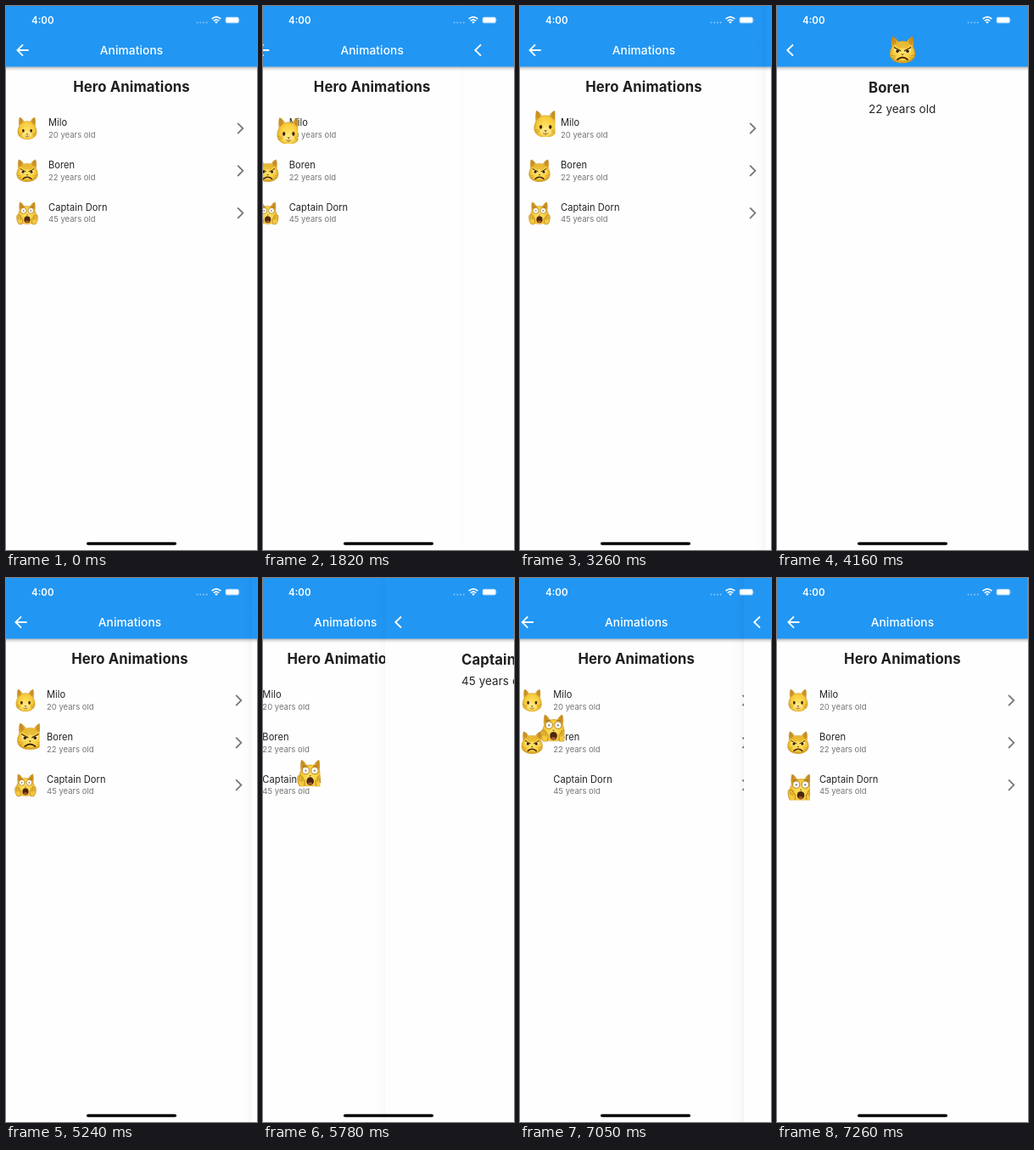
Animation of 296 by 640 pixels, one loop 7.31 s. Source, as an HTML page:

```html
<!DOCTYPE html>
<html lang="en">
<head>
<meta charset="utf-8">
<title>Hero Animations</title>
<style>
  html, body { margin: 0; width: 100%; height: 100%; overflow: hidden; background: #fefefe; }
  svg { display: block; width: 296px; height: 640px; font-family: Inter, Roboto, sans-serif; }
  .title { font-size: 13.7px; font-weight: 500; letter-spacing: .12px; fill: #fff; }
  .head { font-size: 16.7px; font-weight: 700; letter-spacing: .12px; fill: #1f1f1f; }
  .name { font-size: 11.1px; letter-spacing: .05px; fill: #222; }
  .age { font-size: 9.5px; fill: #757575; }
  .big { font-size: 13.5px; letter-spacing: .05px; fill: #262626; }
  .line { fill: none; stroke-width: 1.8; }
</style>
</head>
<body>
<svg id="stage" viewBox="0 0 296 640"></svg>
<script>
const W = 296, LOOP = 7310, FLIGHT = 400;

const people = [
  { name: 'Milo', age: 20, left: 108 },
  { name: 'Boren', age: 22, left: 108 },
  { name: 'Captain Dorn', age: 45, left: 90 },
];

// Screen refreshes happen in `steps` moments from `first` to `last`.
const moves = [
  { row: 0, push: true, start: 1790, first: 1820, last: 2260, steps: 5 },
  { row: 0, push: false, start: 2970, first: 3050, last: 3370, steps: 4 },
  { row: 1, push: true, start: 3757, first: 3850, last: 4160, steps: 4 },
  { row: 1, push: false, start: 4950, first: 5010, last: 5350, steps: 4 },
  { row: 2, push: true, start: 5700, first: 5780, last: 6100, steps: 4 },
  { row: 2, push: false, start: 6870, first: 6950, last: 7260, steps: 4 },
];

const rowY = row => 144 + 49.8 * row;
const lerp = (a, b, t) => a + (b - a) * t;

function cubic(x1, y1, x2, y2) {
  const at = (a, b, s) => 3 * a * s * (1 - s) ** 2 + 3 * b * s * s * (1 - s) + s ** 3;
  return x => {
    if (x <= 0 || x >= 1) return x <= 0 ? 0 : 1;
    let lo = 0, hi = 1;
    for (let i = 0; i < 30; i++) {
      const mid = (lo + hi) / 2;
      if (at(x1, x2, mid) < x) lo = mid; else hi = mid;
    }
    return at(y1, y2, lo);
  };
}
const slideIn = cubic(.35, .91, .33, .97);
const slideOut = cubic(.67, .03, .65, .09);
const heroEase = cubic(.4, 0, .2, 1);

// Circular path between two points, level or upright at one end.
function arc(a, b, t) {
  const dx = b.x - a.x, dy = b.y - a.y, dist = Math.hypot(dx, dy);
  const wide = Math.abs(dx) >= Math.abs(dy);
  const r = dist * dist / (2 * Math.abs(wide ? dy : dx));
  const sweep = 2 * Math.asin(dist / (2 * r));
  const angle = sweep * (wide ? t : 1 - t);
  const along = r * Math.sin(angle), across = r * (1 - Math.cos(angle));
  return wide
    ? { x: a.x + Math.sign(dx) * along, y: a.y + Math.sign(dy) * across }
    : { x: b.x - Math.sign(dx) * across, y: b.y - Math.sign(dy) * along };
}

const mirror = shape => `${shape}<g transform="scale(-1 1)">${shape}</g>`;

const head = `
  <path d="M-11.6-15.6C-9-15-6.4-12.2-4.8-9.6Q0-10.8 4.8-9.6C6.4-12.2 9-15 11.6-15.6
    C12.8-11.5 12.9-7 12.2-3.4C14.2 0 15 4 14.2 7.4C12.6 12.6 6.6 15.6 0 15.6
    S-12.6 12.6-14.2 7.4C-15 4-14.2 0-12.2-3.4C-12.9-7-12.8-11.5-11.6-15.6Z"
    fill="url(#fur)" stroke="#b98218" stroke-width=".4"/>
  ${mirror('<path d="M-10.9-13.6C-9-12.6-7.4-10.6-6.5-8.8L-11-4.8Q-11.8-9-10.9-13.6Z" fill="#c68a2a" opacity=".8"/>')}`;

const whiskers = mirror('<path d="M8 7.4L13.6 6.4M8 9L13 10" stroke="#a87a20" stroke-width=".5"/>');

const cats = [
  `<g transform="scale(.93 1)">${head}${whiskers}</g>
   <ellipse cy="8.6" rx="6.4" ry="5" fill="#ffec94" opacity=".7"/>
   ${mirror('<ellipse cx="5.6" cy="3.4" rx="1.6" ry="2.4" fill="#3d2811"/>')}
   <path d="M-1.8 7.4H1.8L0 9.2Z" fill="#70431c"/>
   <path d="M-3.2 10.6Q-1.5 12.6 0 10.6Q1.5 12.6 3.2 10.6" fill="none" stroke="#70431c" stroke-width=".8"/>
   <path d="M-1.2 12.2Q0 14 1.2 12.2Z" fill="#a35325"/>`,

  `<g transform="scale(1.03 1)">${head}${whiskers}</g>
   <path d="M-9.5-7Q0-11 9.5-7L4-1Q0-3-4-1Z" fill="#c48a18" opacity=".3"/>
   <path d="M-13.6 8.6C-9 14 9 14 13.6 8.6C11 13.4 6 15.4 0 15.4S-11 13.4-13.6 8.6Z" fill="#b47a12" opacity=".45"/>
   ${mirror('<path d="M2.6 1.8L9.6-1.4Q10.2 3.4 6.6 4Q3.4 4 2.6 1.8Z" fill="#fff0b0"/><circle cx="6" cy="1.7" r="1.8" fill="#352008"/><path d="M2 1.4Q6-.2 10-3" fill="none" stroke="#4a2b0c" stroke-width="1.2"/>')}
   <path d="M-1.6 5H1.6L0 6.8Z" fill="#65401b"/>
   <path d="M-6 11.4Q0 6.6 6 11.4" fill="none" stroke="#452610" stroke-width="1.9" stroke-linecap="round"/>`,

  `<g transform="scale(.9 1)">${head}</g>
   ${mirror('<circle cx="5.3" cy="-3.4" r="4.1" fill="#fff" stroke="#a9761a" stroke-width=".9"/><circle cx="5.2" cy="-3.3" r="1.2" fill="#8f8f86"/><path d="M3.4-8.8Q6-9.8 8.8-8" fill="none" stroke="#8c5d17" stroke-width=".8"/>')}
   <path d="M-1.4 2.2H1.4L0 3.8Z" fill="#70431c"/>
   <ellipse cy="9.2" rx="4.3" ry="4.8" fill="#4b2710"/>
   <ellipse cy="12" rx="2.7" ry="1.6" fill="#a9553a"/>
   ${mirror('<path d="M11.8 15.8C14.4 12.6 15.4 7.6 14.6 3.4Q13.4 1.4 12.5 3.6Q11.2.8 10.1 3.6Q8.4 3 8.5 6.4Q6.2 7 6.4 10Q6.6 13.4 7.2 15.8Z" fill="#f6c93c" stroke="#a8720f" stroke-width=".7"/><path d="M8.5 6.4L9.2 10M10.1 3.8L10.9 9M12.5 3.8L12.7 9" stroke="#a8720f" stroke-width=".6"/>')}`,
];

const bar = `
  <rect width="${W}" height="640" fill="#fefefe"/>
  <rect y="71.4" width="${W}" height="5" fill="url(#drop)"/>
  <rect width="${W}" height="71.5" fill="#2196f3"/>`;

const listRow = (p, i) => {
  const y = rowY(i);
  return `<use class="thumb" href="#cat${i}" transform="translate(25 ${y}) scale(.83)"/>
    <text class="name" x="50" y="${y - 3}">${p.name}</text>
    <text class="age" x="50" y="${y + 10.8}">${p.age} years old</text>
    <path class="line" stroke="#777" d="M273.2 ${y - 6.2}L279.4 ${y}L273.2 ${y + 6.2}"/>`;
};

const stage = document.getElementById('stage');
stage.innerHTML = `
  <defs>
    <radialGradient id="fur" cx=".5" cy=".6" r=".62">
      <stop offset="0" stop-color="#ffe468"/><stop offset=".6" stop-color="#f7cb3a"/>
      <stop offset="1" stop-color="#c98e1c"/>
    </radialGradient>
    <linearGradient id="drop" x2="0" y2="1">
      <stop stop-color="#000" stop-opacity=".32"/><stop offset=".4" stop-color="#000" stop-opacity=".13"/>
      <stop offset="1" stop-color="#000" stop-opacity="0"/>
    </linearGradient>
    <linearGradient id="side">
      <stop stop-opacity="0"/><stop offset=".6" stop-opacity=".015"/><stop offset="1" stop-opacity=".045"/>
    </linearGradient>
    <clipPath id="window"><rect id="crop" x="-18" y="-20"/></clipPath>
    ${cats.map((c, i) => `<g id="cat${i}">${c}</g>`).join('')}
  </defs>
  <g id="list">${bar}
    <path class="line" stroke="#fff" d="M26.6 52H14M20 45.4L13.4 52L20 58.6"/>
    <text class="title" x="148" y="56.5" text-anchor="middle">Animations</text>
    <text class="head" x="148" y="101.3" text-anchor="middle">Hero Animations</text>
    ${people.map(listRow).join('')}
  </g>
  <g id="detail">
    <rect id="edge" x="-15" width="15" height="640" fill="url(#side)"/>${bar}
    <path class="line" stroke="#fff" d="M19 45.5L12.2 52L19 58.5"/>
    <use id="portrait" transform="translate(148 51.5)"/>
    <text id="who" class="head" y="101.8"></text>
    <text id="years" class="big" y="126"></text>
  </g>
  <g id="hero"><g clip-path="url(#window)"><use id="flyer"/></g></g>
  <g fill="#fff">
    <text x="30" y="21" font-size="11.5" font-weight="600">4:00</text>
    <g opacity=".45">${[0, 1, 2, 3].map(i => `<circle cx="${225.6 + 3.7 * i}" cy="19.6" r="1"/>`).join('')}</g>
    <path d="M242.6 15.2Q248 10.4 253.4 15.2M244.7 17.5Q248 14.6 251.3 17.5" fill="none" stroke="#fff" stroke-width="1.6"/>
    <path d="M246.2 18.9Q248 17.3 249.8 18.9L248 20.8Z"/>
    <rect x="258.6" y="12.8" width="16.4" height="7.6" rx="2.2" opacity=".45"/>
    <rect x="259.4" y="13.6" width="14.8" height="6" rx="1.5"/>
    <path d="M275.7 15.2Q277.2 16.6 275.7 18Z" opacity=".6"/>
  </g>
  <rect x="95" y="630.7" width="106" height="3.6" rx="1.8" fill="#000"/>`;

const el = id => document.getElementById(id);
const thumbs = [...stage.querySelectorAll('.thumb')];
const show = (node, on) => node.setAttribute('visibility', on ? 'visible' : 'hidden');
const place = (node, x, y = 0) => node.setAttribute('transform', `translate(${x} ${y})`);

function stateAt(time) {
  const move = moves.filter(m => m.first <= time).pop();
  if (!move) return { row: 0, push: false, p: 1 };
  const gap = (move.last - move.first) / (move.steps - 1);
  const moment = k => Math.round((move.first + k * gap) / 10) * 10;
  let k = move.steps - 1;
  while (k > 0 && moment(k) > time) k--;
  return { ...move, p: Math.min(1, (moment(k) - move.start) / FLIGHT) };
}

function render(time) {
  const { row, push, p } = stateAt(time);
  const flying = p < 1;
  const cover = push ? slideIn(p) : slideOut(1 - p);
  const person = people[row];

  place(el('list'), -W / 3 * cover);
  place(el('detail'), Math.round(W * (1 - cover)));
  show(el('detail'), cover > 0);
  el('edge').setAttribute('opacity', slideIn(push ? p : 1 - p));

  el('who').textContent = person.name;
  el('years').textContent = `${person.age} years old`;
  el('who').setAttribute('x', person.left);
  el('years').setAttribute('x', person.left);

  el('portrait').setAttribute('href', `#cat${row}`);
  el('portrait').setAttribute('opacity', flying ? 0 : 1);
  thumbs.forEach((thumb, i) => thumb.setAttribute('opacity', flying && i === row ? 0 : 1));

  show(el('hero'), flying);
  if (!flying) return;
  const t = heroEase(p), grown = push ? t : 1 - t;
  const low = { x: 28, y: rowY(row) + 3 }, high = { x: 148, y: 51.5 };
  const at = push ? arc(low, high, t) : arc(high, low, t);
  place(el('hero'), at.x, at.y);
  el('flyer').setAttribute('href', `#cat${row}`);
  el('crop').setAttribute('width', 18 + lerp(11, 17, grown));
  el('crop').setAttribute('height', 20 + lerp(15, 18, grown));
}

const began = performance.now();
function tick() {
  render((performance.now() - began) % LOOP);
  requestAnimationFrame(tick);
}
tick();
</script>
</body>
</html>
```
